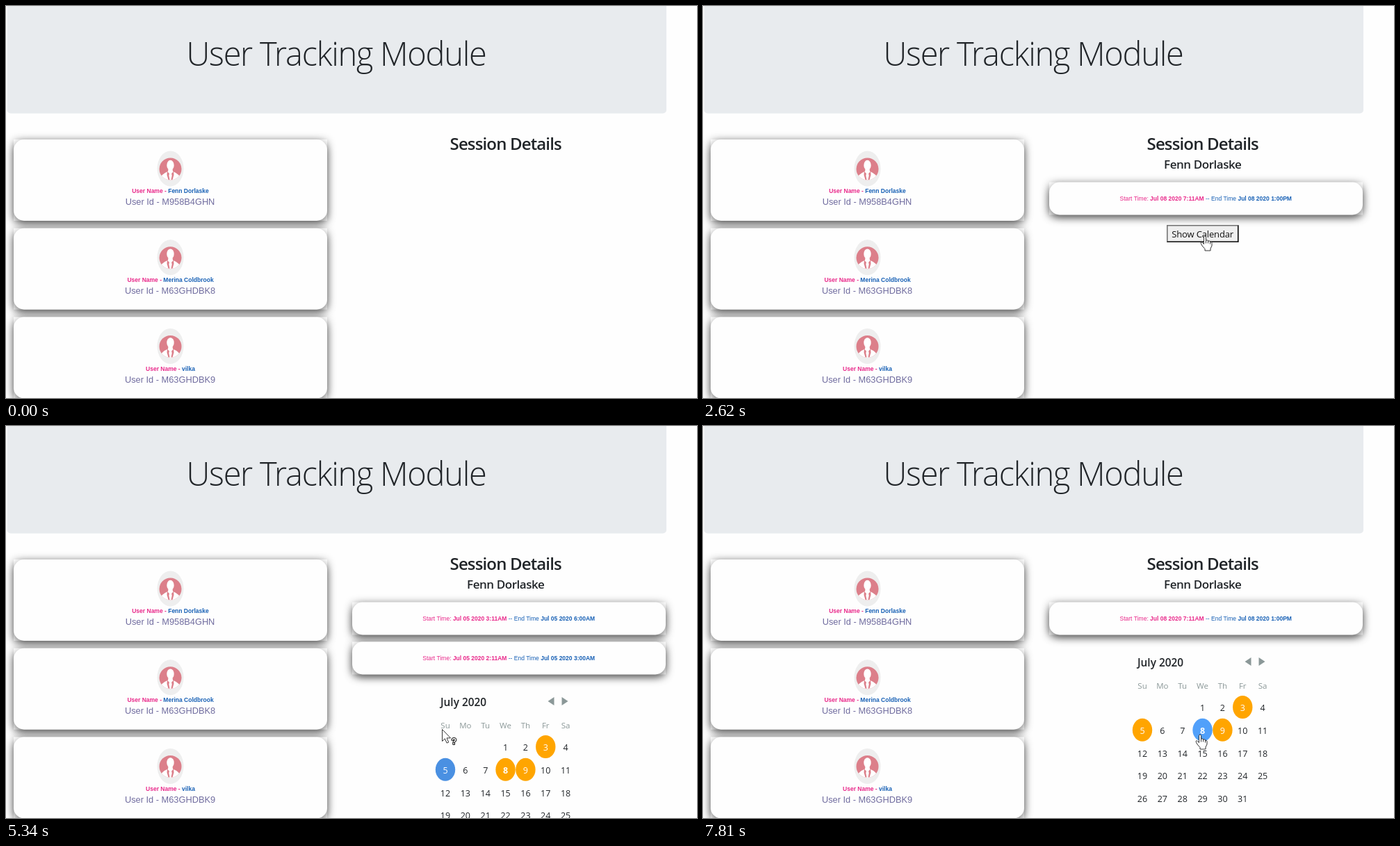
Recreate the animation shown at these times as an HTML page with a canvas. Size 994 by 564 pixels, loop 8000 ms.

```html
<!DOCTYPE html>
<html lang="en">
<head>
<meta charset="utf-8">
<title>User Tracking Module</title>
<style>
  html, body { margin: 0; width: 100%; height: 100%; overflow: hidden; background: #fefefe; }
  canvas { display: block; }
</style>
</head>
<body>
<canvas id="stage" width="994" height="564"></canvas>
<script>
const ctx = document.getElementById('stage').getContext('2d');
const LOOP = 8000;
const UI = '"Open Sans", "Noto Sans", sans-serif';
const ARIAL = '"Liberation Sans", Arial, sans-serif';
const INK = '#212529', PINK = '#e9288a', BLUE = '#1760b5', PURPLE = '#706c9f';
const MUTED = '#8b9898', ORANGE = '#ffa500', ROSE = '#dc7f8a', PAPER = '#fefefe';

const users = [
  ['Fenn Dorlaske', 'M958B4GHN'],
  ['Merina Coldbrook', 'M63GHDBK8'],
  ['vilka', 'M63GHDBK9']
];
const sessions = {
  8: [['Jul 08 2020 7:11AM', 'Jul 08 2020 1:00PM']],
  5: [['Jul 05 2020 3:11AM', 'Jul 05 2020 6:00AM'],
      ['Jul 05 2020 2:11AM', 'Jul 05 2020 3:00AM']]
};
const activeDays = [3, 5, 8, 9];
const today = 8;

// Times of the clicks
const OPEN = 1850, PRESS = 3000, RELEASE = 3080, CALENDAR = 3230;
const PICKS = [[5340, 5], [6580, 3], [7730, 8]];

// Pointer hot spot: time, x, y
const path = [
  [300, 737, 396], [620, 520, 285], [880, 300, 188], [1070, 253, 224],
  [1150, 244, 222], [1260, 233, 222], [1420, 239, 230], [1550, 245, 233],
  [1850, 245, 233], [1930, 272, 246], [2240, 668, 376], [2320, 668, 376],
  [2620, 722, 331], [3560, 722, 331], [3780, 746, 444], [3880, 746, 444],
  [3950, 738, 440], [4100, 743, 443], [4250, 745, 443], [4430, 745, 443],
  [4800, 690, 437], [5100, 621, 440], [5260, 627, 436], [5660, 627, 436],
  [6000, 720, 393], [6250, 800, 428], [6500, 771, 461], [6740, 771, 461],
  [6890, 762, 468], [7120, 733, 458], [7350, 715, 444], [8000, 715, 444]
];

const grid = { x: 632, y: 404.5, dx: 28.85, dy: 32.8 };

function pointerAt(t) {
  if (t < path[0][0]) return null;
  const i = Math.max(1, path.findIndex(k => k[0] > t));
  const [t0, x0, y0] = path[i - 1], [t1, x1, y1] = path[i];
  const p = (t - t0) / (t1 - t0);
  return { x: Math.round(x0 + (x1 - x0) * p), y: Math.round(y0 + (y1 - y0) * p) };
}

function text(str, x, y, font, color, align = 'center', spacing = 0) {
  ctx.font = font;
  ctx.fillStyle = color;
  ctx.textAlign = align;
  ctx.letterSpacing = spacing + 'px';
  ctx.fillText(str, x, y);
}

// Centred line made of [text, weight, colour] parts
function line(parts, cx, y, size) {
  ctx.letterSpacing = '0px';
  const fonts = parts.map(p => `${p[1]} ${size}px ${ARIAL}`);
  const widths = parts.map((p, i) => {
    ctx.font = fonts[i];
    return ctx.measureText(p[0]).width;
  });
  let x = cx - widths.reduce((a, b) => a + b) / 2;
  parts.forEach((p, i) => {
    text(p[0], x, y, fonts[i], p[2], 'left');
    x += widths[i];
  });
}

function shape(points, fill) {
  ctx.beginPath();
  points.forEach(([x, y]) => ctx.lineTo(x, y));
  ctx.closePath();
  ctx.fillStyle = fill;
  ctx.fill();
}

function ellipse(x, y, rx, ry, fill) {
  ctx.beginPath();
  ctx.ellipse(x, y, rx, ry, 0, 0, Math.PI * 2);
  ctx.fillStyle = fill;
  ctx.fill();
}

function card(x, y, w, h) {
  const layer = (radius, alpha, drop) => {
    ctx.shadowColor = `rgba(0,0,0,${alpha})`;
    ctx.shadowBlur = 12;
    ctx.shadowOffsetY = drop;
    ctx.beginPath();
    ctx.roundRect(x, y, w, h, radius);
    ctx.fill();
  };
  ctx.save();
  ctx.fillStyle = PAPER;
  layer(0, 0.3, 2);
  layer(15, 0.55, 4);
  ctx.restore();
}

function avatar(x, y) {
  ctx.save();
  ctx.translate(x, y);
  ellipse(0, 0, 19, 25.5, '#eeeeee');
  ellipse(0, 0.5, 16, 16, ROSE);
  ctx.beginPath();
  ctx.arc(0, 0.5, 16, 0, Math.PI * 2);
  ctx.clip();
  ellipse(0, -5, 5.2, 7.2, '#fff');
  ctx.beginPath();
  ctx.moveTo(-17, 18);
  ctx.quadraticCurveTo(-14, 8, -3.5, 4);
  ctx.lineTo(-3, 0);
  ctx.lineTo(3, 0);
  ctx.lineTo(3.5, 4);
  ctx.quadraticCurveTo(14, 8, 17, 18);
  ctx.fillStyle = '#fff';
  ctx.fill();
  for (const s of [-1, 1]) {
    shape([[s * 4.6, 4], [s * 1.6, 7], [s * 2.2, 10], [s * 1, 16], [s * 3, 16], [s * 5, 9]], ROSE);
  }
  ctx.restore();
}

function userCard([name, id], i) {
  const y = 192 + i * 127.7;
  card(11, y, 451, 117);
  avatar(236.5, y + 42);
  line([['User Name - ', 'bold', PINK], [name, 'bold', BLUE]], 236.5, y + 77.3, 8.5);
  text('User Id - ' + id, 236, y + 94.4, `12.8px ${ARIAL}`, PURPLE);
}

function sessionCard([start, end], i) {
  const y = 253.5 + i * 57;
  card(498, y, 451, 47);
  line([
    ['Start Time: ', 'normal', PINK], [start, 'bold', PINK], [' -- ', 'normal', BLUE],
    ['End Time ', 'normal', BLUE], [end, 'bold', BLUE]
  ], 723.2, y + 26.4, 8.5);
}

function button(t) {
  const pressed = t >= PRESS && t < RELEASE, focused = t >= RELEASE;
  const light = '#767676', dark = '#151515';
  const x = 667, y = 315, w = 103.5, h = 25;
  ctx.fillStyle = pressed || focused ? dark : light;
  ctx.fillRect(x, y, w, h);
  const edge = pressed ? light : dark;
  shape([[x + w, y], [x + w, y + h], [x, y + h], [x + 2, y + h - 2], [x + w - 2, y + h - 2], [x + w - 2, y + 2]], edge);
  ctx.fillStyle = pressed ? '#f5f5f5' : '#efefef';
  ctx.fillRect(x + 1.6, y + 1.6, w - 3.2, h - 3.2);
  text('Show Calendar', 718.6, 333, `13px ${UI}`, '#111', 'center', -0.15);
}

function dayColor(day, selected, hovered) {
  if (day === selected) return day === hovered ? '#51a0fa' : '#4a90e2';
  if (!activeDays.includes(day)) return null;
  return day === hovered ? '#f0f8ff' : ORANGE;
}

function calendar(dy, selected, hovered) {
  ctx.save();
  ctx.translate(0, dy);
  text('July 2020', 625, 346.3, `600 15.4px ${UI}`, INK, 'left');
  shape([[779.5, 339], [788.5, 333], [788.5, 345]], MUTED);
  shape([[808.5, 339], [799.5, 333], [799.5, 345]], MUTED);
  ['Su', 'Mo', 'Tu', 'We', 'Th', 'Fr', 'Sa'].forEach((d, i) =>
    text(d, grid.x + i * grid.dx, 378, `11.5px ${UI}`, MUTED));
  for (let day = 1; day <= 31; day++) {
    const cell = day + 2;
    const x = grid.x + cell % 7 * grid.dx, y = grid.y + Math.floor(cell / 7) * grid.dy;
    const fill = dayColor(day, selected, hovered);
    if (fill) ellipse(x, y, 14.2, 16.5, fill);
    text(day, x, y + 5.5, `${day === today ? 700 : 400} 12.5px ${UI}`, fill ? '#fff' : INK);
  }
  ctx.restore();
}

function hitDay({ x, y }, dy) {
  const col = Math.round((x - grid.x) / grid.dx);
  const row = Math.round((y - dy - grid.y) / grid.dy);
  if (col < 0 || col > 6 || row < 0 || row > 4) return 0;
  return row * 7 + col - 2;
}

function outline(d) {
  const p = new Path2D(d);
  ctx.lineJoin = 'round';
  ctx.fillStyle = '#fff';
  ctx.fill(p);
  ctx.strokeStyle = '#2a2a2a';
  ctx.lineWidth = 0.95;
  ctx.stroke(p);
}

function drawPointer({ x, y }, kind) {
  ctx.save();
  if (kind === 'hand') {
    ctx.translate(x - 6.5, y - 0.5);
    outline('M5 12V2Q5 .5 6.5 .5T8 2V7Q9.5 5.5 11 7V8Q12.5 6.6 14 8V9Q16.5 8 16.5 10.5V14.5' +
      'L14.5 18.5V21.5H6.5V19L2.5 14.5L.7 11Q.3 9 2.2 9.3Z');
    outline('M8 7V11M11 8V11M14 9V12');
  } else {
    ctx.translate(x + 0.5, y + 0.5);
    outline('M0 0V17L3.9 13.4L6.6 19.6L9.2 18.5L6.6 12.4H12Z');
    if (kind === 'help') {
      ctx.font = `bold 12px ${ARIAL}`;
      ctx.letterSpacing = '0px';
      ctx.textAlign = 'center';
      ctx.strokeStyle = '#111';
      ctx.lineWidth = 2;
      ctx.strokeText('?', 17, 21);
      ctx.fillStyle = '#fff';
      ctx.fillText('?', 17, 21);
    }
  }
  ctx.restore();
}

function pointerKind({ x, y }, t, dy, day) {
  if (t < OPEN) return 'arrow';
  if (t < CALENDAR) return x > 667 && x < 771 && y > 315 && y < 341 ? 'hand' : 'arrow';
  if (activeDays.includes(day)) return 'hand';
  const rowY = y - dy;
  return x > 618 && x < 820 && rowY > 362 && rowY < 387 ? 'help' : 'arrow';
}

function draw(t) {
  const selected = PICKS.reduce((s, [at, day]) => t >= at ? day : s, 0);
  const list = sessions[selected] || sessions[8];
  const dy = (list.length - 1) * 57;
  const pointer = pointerAt(t);
  const day = pointer && t >= CALENDAR ? hitDay(pointer, dy) : 0;

  ctx.fillStyle = PAPER;
  ctx.fillRect(0, 0, 994, 564);
  ctx.fillStyle = '#e8ebee';
  ctx.beginPath();
  ctx.roundRect(1.5, -10, 948.5, 164.5, 5);
  ctx.fill();
  text('User Tracking Module', 475, 86, `300 47px ${UI}`, INK, 'center', -1.3);

  users.forEach(userCard);

  text('Session Details', 718.7, 206.5, `600 24px ${UI}`, INK, 'center', -0.85);
  if (t >= OPEN) {
    text(users[0][0], 718.7, 234.3, `600 17px ${UI}`, INK, 'center', -0.45);
    list.forEach(sessionCard);
    if (t < CALENDAR) button(t);
    else calendar(dy, selected, day);
  }
  if (pointer) drawPointer(pointer, pointerKind(pointer, t, dy, day));
}

function tick() {
  draw(performance.now() % LOOP);
  requestAnimationFrame(tick);
}
tick();
</script>
</body>
</html>
```
